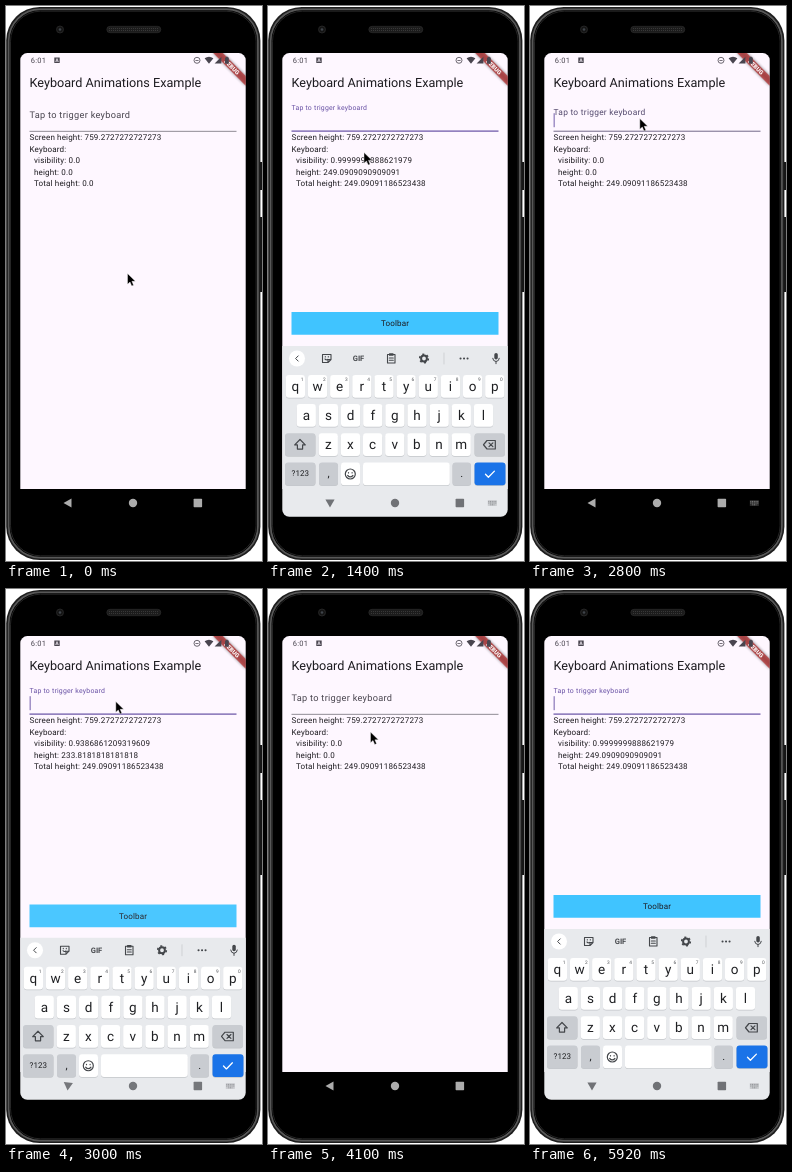
Recreate the animation shown at these times as an HTML page. Size 256 by 555 pixels, loop 6030 ms.

```html
<!DOCTYPE html>
<html lang="en">
<head>
<meta charset="utf-8">
<title>Keyboard animation</title>
<style>
html, body { margin: 0; width: 100%; height: 100%; overflow: hidden; background: #fff; }
svg { display: block; width: 256px; height: 555px; font-family: Roboto, sans-serif; }
text { white-space: pre; text-rendering: geometricPrecision; }
.info { font-size: 8.06px; letter-spacing: .144px; fill: #1d1b20; }
.line { fill: none; stroke: #44474b; stroke-linecap: round; stroke-linejoin: round; }
</style>
</head>
<body>
<svg viewBox="0 0 256 555">
  <defs>
    <clipPath id="screen"><rect x="14.300" y="47.100" width="225.400" height="463.600" rx="7"/></clipPath>
    <filter id="soft" x="-20%" y="-100%" width="140%" height="300%"><feGaussianBlur stdDeviation="1.500"/></filter>
  </defs>

  <!-- phone -->
  <path d="M253 156h3v28h-3zM253 211h3v75h-3z" fill="#151515"/>
  <rect x=".2" y="1" width="254.200" height="553" rx="33.500" fill="#1d1d1d"/>
  <rect x="2.700" y="3.300" width="249.200" height="548.400" rx="31.500" fill="#000" stroke="#585858" stroke-width="1.700"/>
  <rect x="4.500" y="5.200" width="245.600" height="544.600" rx="30" fill="#000" stroke="#262626"/>
  <circle cx="54" cy="23.500" r="3.500" fill="#141414" stroke="#2b2b2b" stroke-width=".8"/>
  <circle cx="54" cy="23.500" r="1.300" fill="#3f444a"/>
  <rect x="100.800" y="20.300" width="54" height="6.400" rx="3.200" fill="#1c1c1c" stroke="#303030" stroke-width=".6"/>
  <path d="M103 22.500h50M103 24.500h50" stroke="#3c3c3c" stroke-width=".9" stroke-dasharray="1 1"/>

  <g clip-path="url(#screen)">
    <path d="M14 47h227v436.100h-227z" fill="#fef7ff"/>
    <g transform="translate(239.700 47.100) rotate(45)">
      <path d="M-23 16.100h46v6.900h-46z" fill="#000" opacity=".45" filter="url(#soft)"/>
      <path d="M-23 16.100h46v6.900h-46z" fill="#b71c1c" fill-opacity=".63"/>
      <text y="21.600" font-size="5.870" font-weight="900" fill="#fff" text-anchor="middle">DEBUG</text>
    </g>
    <!-- status bar -->
    <g fill="#49454f">
      <text x="24.800" y="57.100" font-size="7.500" letter-spacing=".25">6:01</text>
      <path d="M48.300 51.500h5.400v5.600h-5.400z"/>
      <path d="M49.700 56l1.300-3.400 1.300 3.400M50.200 55h1.600" fill="none" stroke="#fef7ff" stroke-width=".7"/>
      <circle cx="191" cy="54.300" r="3" fill="none" stroke="#49454f" stroke-width=".8"/>
      <path d="M189.400 53.900h3.200v.9h-3.200z"/>
      <path d="M198.600 52.300q4.400-3.300 8.800 0l-4.400 5.500z"/>
      <path d="M208.600 57.600h6.800v-6.800zM219 51.600h1v-.8h1.800v.8h1v6.200h-3.800z"/>
    </g>

    <!-- app -->
    <text x="23.500" y="81.200" font-size="12.660" fill="#1d1b20">Keyboard Animations Example</text>
    <g id="label"><text font-size="9.200" letter-spacing=".29">Tap to trigger keyboard</text></g>
    <rect id="rule" x="23.500" width="207"/>
    <rect id="caret" x="23.600" y="107.200" width="1.150" height="14" fill="#6750a4" opacity=".8"/>
    <g class="info">
      <text x="23.500" y="134">Screen height: 759.2727272727273</text>
      <text x="23.500" y="145.500">Keyboard:</text>
      <text x="28" y="157" id="vis"></text>
      <text x="28" y="168.500" id="height"></text>
      <text x="28" y="180" id="total"></text>
    </g>
    <g id="bar">
      <path d="M23.500 306h207v22.700h-207z" fill="#40c4ff"/>
      <text class="info" x="127" y="320.200" text-anchor="middle">Toolbar</text>
    </g>

    <g id="board">
      <path d="M14 340h227v172h-227z" fill="#e8eaed"/>
      <circle cx="29" cy="352.500" r="8" fill="#fff"/>
      <path id="chevron" class="line" d="M1.200-2.600l-2.600 2.600 2.600 2.600"/>
      <g id="tools" class="line" stroke-width="1.100">
        <path d="M54.500 348.500h8.500v5l-3 3h-5.500zM63 353.500h-3v3M57.300 350.500v.4M60.300 350.500v.4M57 353q1.500 1.500 2.500 .3"/>
        <text x="90.500" y="355.300" font-size="7.600" font-weight="700" text-anchor="middle" fill="#44474b" stroke="none">GIF</text>
        <path d="M119.500 348.500h7.500v8.500h-7.500zM121.500 347.700h3.500v1.600h-3.500zM121.300 352h4M121.300 354.300h4"/>
        <circle cx="156" cy="352.500" r="2.900" stroke-width="2"/>
        <circle cx="156" cy="352.500" r="4.300" stroke-width="1.600" stroke-linecap="butt" stroke-dasharray="2 2.500"/>
        <path d="M176 347v11" stroke="#c4c7cb" stroke-width=".7"/>
        <path d="M192.500 352.500h.1M196 352.500h.1M199.500 352.500h.1" stroke-width="2"/>
      </g>
      <rect x="226.300" y="347" width="3.500" height="6.500" rx="1.750" fill="#44474b"/>
      <path class="line" d="M224.700 352.300q.3 3 3.300 3.200q3-.2 3.300-3.200M228 355.700v2"/>
      <g id="keys"></g>
      <g class="line" stroke-width="1.200">
        <path d="M32 433.500l5.300 5.400h-2.700v4.200h-5.200v-4.200h-2.700z"/>
        <path d="M219 434.500h8.300v8.500h-8.300l-3.500-4.250zM221 436.800l3.900 3.900M224.900 436.800l-3.900 3.900"/>
        <circle cx="82.300" cy="468" r="5"/>
        <path d="M80.500 466.500v.4M84.100 466.500v.4M79.700 469.500q2.600 2.800 5.200 0"/>
        <path d="M217.500 468.300l2.900 2.900 6-6.100" stroke="#fff" stroke-width="1.300"/>
      </g>
    </g>

    <!-- navigation -->
    <g id="nav">
      <path id="back" d="M-4.500 0l8-4.600v9.200z"/>
      <circle cx="127" cy="497" r="4.200"/>
      <rect x="187.600" y="492.800" width="8.500" height="8.500" rx=".7"/>
      <g id="switch" opacity=".8">
        <path d="M219.800 494.300h9v5.600h-9z" opacity=".35"/>
        <path d="M220.300 495.400h8M220.300 497h8M222.300 498.800h4" stroke-width=".9" stroke-dasharray="1 .75" fill="none" id="dots"/>
      </g>
    </g>
  </g>
  <path id="mouse" d="M0 0v10.800l2.500-2.300 1.700 4 1.900-.8-1.700-3.900h3.500z" fill="#000" stroke="#fff" stroke-width=".4"/>
</svg>
<script>
const LOOP = 6030, FULL = 249.09091186523438, SLIDE = 285, FLOAT = 167;
const $ = id => document.getElementById(id);
const set = (id, attrs) => { for (const k in attrs) $(id).setAttribute(k, attrs[k]); };
const show = (id, on) => set(id, { visibility: on ? "visible" : "hidden" });
const mix = (a, b, p) => a + (b - a) * p;
const rgb = (a, b, p) => `rgb(${a.map((v, i) => Math.round(mix(v, b[i], p)))})`;

// focus, blur, board rise, reported rise, board fall
const sessions = [
  { focus: 545, blur: 1740, rise: 853, report: 900, fall: 1820 },
  { focus: 2751, blur: 3567, rise: 2800, report: 2800, fall: 3650 },
  { focus: 4510, blur: 1e5, rise: 4557.9, report: 4557.9, fall: 1e5 }
];
// time, x, y of the pointer tip
const track = [
  [0, 121.500, 267.500], [100, 117, 245], [400, 95, 116.500], [1200, 95, 116.500], [1400, 96, 146.500],
  [1600, 105, 226], [2100, 108, 228], [2500, 109.800, 117], [2600, 109.800, 112.500], [3300, 109.800, 112.500],
  [3500, 110.800, 222], [3600, 110.800, 229], [3700, 110.800, 229], [4100, 102.500, 143],
  [4400, 103, 119.500], [LOOP, 103, 119.500]
];

// cubic-bezier(.4, 0, .2, 1)
function ease(x) {
  if (x <= 0) return 0;
  if (x >= 1) return 1;
  let lo = 0, hi = 1, s;
  for (let i = 0; i < 30; i++) {
    s = (lo + hi) / 2;
    const r = 1 - s;
    if (1.2 * r * r * s + .6 * r * s * s + s * s * s < x) lo = s; else hi = s;
  }
  return 3 * s * s - 2 * s * s * s;
}

function pointer(t) {
  const i = Math.max(1, track.findIndex(k => k[0] >= t));
  const a = track[i - 1], b = track[i], p = (t - a[0]) / (b[0] - a[0]);
  return [mix(a[1], b[1], p), mix(a[2], b[2], p)];
}

const num = v => Number.isInteger(v) ? v.toFixed(1) : String(v);

function key(x, y, w, text, size = 12.5, fill = "#fff", hint = "") {
  const mid = x + w / 2;
  return `<rect x="${x}" y="${y + .7}" width="${w}" height="22.8" rx="3" fill="#c3c6ca"/>` +
    `<rect x="${x}" y="${y}" width="${w}" height="22.8" rx="3" fill="${fill}"/>` +
    `<text x="${mid}" y="${y + 11.2 + size * .34}" font-size="${size}" text-anchor="middle" fill="#1f2023">${text}</text>` +
    `<text x="${mid + 6.7}" y="${y + 6.2}" font-size="4.8" text-anchor="middle" fill="#55585c">${hint}</text>`;
}

function buildKeys() {
  const grey = "#c9ccd1", pitch = 22.15;
  const row = (letters, x, y, hints = "") => [...letters].map((c, i) =>
    key(x + i * pitch, y, 19.2, c, 13.5, "#fff", hints[i])).join("");
  $("keys").innerHTML =
    row("qwertyuiop", 17.800, 369, "1234567890") + row("asdfghjkl", 28.700, 398) + row("zxcvbnm", 50.700, 427.300) +
    key(17, 427.300, 30.500, "", 8, grey) + key(206.500, 427.300, 30.500, "", 8, grey) +
    key(17, 456.500, 30.500, "?123", 8, grey) + key(51, 456.500, 19, ",", 11, grey) + key(73, 456.500, 19, "") +
    key(95, 456.500, 86.800, "") + key(184.500, 456.500, 18.500, ".", 11, grey) + key(206.500, 456.500, 31, "", 8, "#1a73e8");
}

function draw(t) {
  const s = sessions.filter(q => q.focus <= t).pop();
  const focused = !!s && t < s.blur;
  const fall = s ? ease((t - s.fall) / SLIDE) : 0;
  const phase = from => s ? ease((t - from) / SLIDE) * (1 - fall) : 0;
  const up = phase(s && s.rise);
  const h = Math.round(phase(s && s.report) * 685) / 2.75, v = h / FULL;

  let float = 0;
  if (s) float = focused ? ease((t - s.focus) / FLOAT) : 1 - ease((t - s.blur) / FLOAT);
  const tint = rgb([73, 69, 79], [103, 80, 164], float);
  set("label", { transform: `translate(23.5 ${mix(112.2, 103.5, float)}) scale(${mix(1, .75, float)})`, fill: tint });
  set("rule", { y: mix(124.9, 124.5, float), height: mix(.6, 1.2, float), fill: tint });
  show("caret", focused && (t - s.focus) % 1000 < 500);

  $("vis").textContent = "visibility: " + num(v);
  $("height").textContent = "height: " + num(h);
  $("total").textContent = "Total height: " + num(t >= sessions[0].rise ? FULL : 0);
  set("bar", { transform: `translate(0 ${154 * (1 - v)})`, opacity: v });

  show("board", up > 0);
  set("board", { transform: `translate(0 ${143.3 * (1 - up)})` });
  show("tools", up > 0 && focused);
  set("chevron", { transform: `translate(29 352.5) scale(${focused ? 1 : -1} 1)` });

  const ink = up > 0 ? rgb([190, 190, 192], [112, 114, 118], up) : "#acacac";
  set("nav", { fill: ink });
  set("dots", { stroke: ink });
  set("back", { transform: `translate(62 497) rotate(${-90 * up})` });
  show("switch", focused && t >= s.rise);

  const [x, y] = pointer(t);
  set("mouse", { transform: `translate(${x} ${y})` });
  show("mouse", t < 5920);
}

const start = performance.now();
function tick() {
  const t = (performance.now() - start) % LOOP;
  draw(t >= 5920 ? 5920 : Math.floor(t / 100) * 100);
  requestAnimationFrame(tick);
}
buildKeys();
tick();
</script>
</body>
</html>
```
